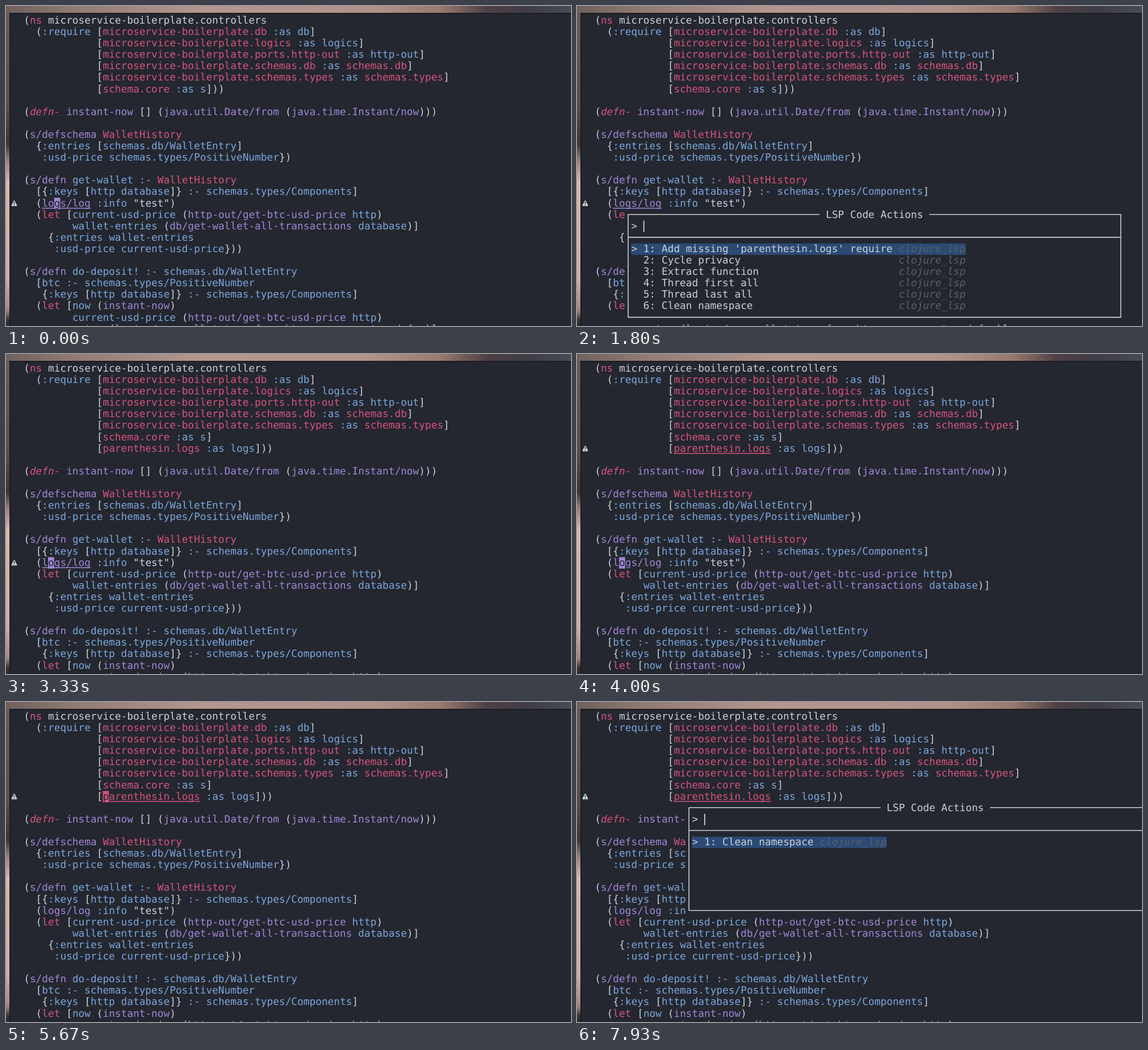
These frames come from a looping animation (995 px wide and 563 px high, 8 s). An HTML page:

```html
<!DOCTYPE html>
<html lang="en">
<head>
<meta charset="utf-8">
<title>Editor code actions</title>
<style>
  html, body { margin: 0; width: 100%; height: 100%; overflow: hidden; background: #24272f; }
  svg { display: block; width: 995px; height: 563px; }
  text {
    font: 17.79px "DejaVu Sans Mono", "Noto Sans Mono", monospace;
    white-space: pre;
    text-rendering: geometricPrecision;
  }
</style>
</head>
<body>
<svg id="stage" viewBox="0 0 995 563">
  <defs>
    <linearGradient id="top">
      <stop offset="0" stop-color="#6f605e"/>
      <stop offset=".12" stop-color="#917b75"/>
      <stop offset=".35" stop-color="#b4988f"/>
      <stop offset=".65" stop-color="#b0938a"/>
      <stop offset=".77" stop-color="#98796f"/>
      <stop offset=".85" stop-color="#4d4045"/>
      <stop offset=".92" stop-color="#3f3d45"/>
      <stop offset="1" stop-color="#484a52"/>
    </linearGradient>
    <linearGradient id="side" x2="0" y2="1">
      <stop offset="0" stop-color="#6a5a57"/>
      <stop offset=".3" stop-color="#5c4d4b"/>
      <stop offset=".42" stop-color="#3c3433"/>
      <stop offset=".47" stop-color="#9a7f76"/>
      <stop offset=".54" stop-color="#d6b9ad"/>
      <stop offset=".85" stop-color="#cdb0a4"/>
      <stop offset=".95" stop-color="#a3867b"/>
      <stop offset=".98" stop-color="#3a3232"/>
      <stop offset="1" stop-color="#2c2a2c"/>
    </linearGradient>
  </defs>
  <rect width="995" height="13" fill="url(#top)"/>
  <rect y="12" width="7" height="551" fill="url(#side)"/>
  <rect x="6" y="12" width="995" height="560" fill="#1b1d22"/>
  <rect x="8" y="14" width="995" height="560" fill="#24272f"/>
</svg>
<script>
const LOOP = 8000, CW = 10.71, RH = 20.1, X0 = 31.2, Y0 = 25;
const C = {
  bg: '#24272f', fg: '#cbd0d8', pink: '#d6537d', blue: '#7ba6dc', violet: '#a087d6',
  str: '#c6d4e2', yellow: '#a6a614', dim: '#5a5f69', sel: '#2b4a74', float: '#212429'
};

const before = `(ns microservice-boilerplate.controllers
  (:require [microservice-boilerplate.db :as db]
            [microservice-boilerplate.logics :as logics]
            [microservice-boilerplate.ports.http-out :as http-out]
            [microservice-boilerplate.schemas.db :as schemas.db]
            [microservice-boilerplate.schemas.types :as schemas.types]
            [schema.core :as s]))

(defn- instant-now [] (java.util.Date/from (java.time.Instant/now)))

(s/defschema WalletHistory
  {:entries [schemas.db/WalletEntry]
   :usd-price schemas.types/PositiveNumber})

(s/defn get-wallet :- WalletHistory
  [{:keys [http database]} :- schemas.types/Components]
  (logs/log :info "test")
  (let [current-usd-price (http-out/get-btc-usd-price http)
        wallet-entries (db/get-wallet-all-transactions database)]
    {:entries wallet-entries
     :usd-price current-usd-price}))

(s/defn do-deposit! :- schemas.db/WalletEntry
  [btc :- schemas.types/PositiveNumber
   {:keys [http database]} :- schemas.types/Components]
  (let [now (instant-now)
        current-usd-price (http-out/get-btc-usd-price http)
        entry (logics/new-wallet-transfers btc now current-usd-fee)]`.split('\n');

const after = [...before];
after.splice(6, 1, '            [schema.core :as s]', '            [parenthesin.logs :as logs]))');

const stage = document.getElementById('stage');
const colX = c => X0 + c * CW;
const rowY = r => Y0 + r * RH;
const cellTop = r => rowY(r) - RH / 2 + .8;

function el(parent, name, attrs = {}) {
  const node = document.createElementNS('http://www.w3.org/2000/svg', name);
  for (const k in attrs) node.setAttribute(k, attrs[k]);
  return parent.appendChild(node);
}
const group = () => el(stage, 'g');

function put(g, row, col, str, fill = C.fg, style = '') {
  const t = el(g, 'text', { x: colX(col), y: rowY(row) + 5.9, fill, style });
  t.textContent = str;
  return t;
}
// Filled block of cells, from column a up to b
const cells = (g, row, a, b, rows, fill) =>
  el(g, 'rect', { x: colX(a), y: cellTop(row), width: (b - a) * CW, height: rows * RH, fill });

function tint(word, prev, row) {
  if (/^[\s()[\]{}]/.test(word)) return C.fg;
  if (word[0] === '"') return C.str;
  if (word[0] === ':') return C.blue;
  if (/^(ns|let|defn-)$/.test(word)) return C.pink;
  if (prev === '(' || word === 'instant-now') return C.violet;
  if (row === 0) return C.fg;
  if (/^(microservice|schema\.core|parenthesin|schemas\.(db|types)$|WalletHistory)/.test(word)) return C.pink;
  return C.blue;
}

const tokens = (line, row) =>
  [...line.matchAll(/\s+|[()[\]{}]+|"[^"]*"|[^\s()[\]{}"]+/g)].map(m =>
    ({ col: m.index, str: m[0], fill: tint(m[0], line[m.index - 1], row) }));

function drawCode(lines) {
  const g = group();
  lines.forEach((line, r) => tokens(line, r).forEach(t => {
    if (t.str.trim()) put(g, r, t.col, t.str, t.fill, t.str === 'defn-' ? 'font-style:italic' : '');
  }));
  return g;
}

// Gutter sign and underline for a flagged word
function drawWarning(row, a, b, fill) {
  const g = group(), y = rowY(row);
  el(g, 'path', { d: `M14.5 ${y - 3.5}L18.5 ${y + 4.5}H10.5Z`, fill: C.fg, stroke: C.fg, 'stroke-width': 2, 'stroke-linejoin': 'round' });
  el(g, 'path', { d: `M14.5 ${y - 2}v3.4m0 1.3v1.5`, stroke: C.bg, 'stroke-width': 1.5 });
  el(g, 'rect', { x: colX(a), y: y + 8.4, width: (b - a) * CW, height: 1.5, fill });
  return g;
}

function drawDiagnostics(row, col, msg) {
  const g = group();
  cells(g, row, col, col + msg.length + 5, 2, C.float);
  put(g, row, col + 1, 'Diagnostics:', C.fg, 'font-weight:bold');
  put(g, row + 1, col + 1, '1.');
  put(g, row + 1, col + 4, msg, C.yellow);
  return g;
}

function drawActions(row, col, rows, titleCol, items) {
  const g = group(), width = 82;
  const l = colX(col + .5), r = colX(col + .5 + width - 1), t = rowY(row), b = rowY(row + rows);
  const title = 'LSP Code Actions', tagCol = col + 7 + Math.max(...items.map(s => s.length));
  cells(g, row, col, col + width, rows + 1, C.bg);
  el(g, 'path', {
    d: `M${colX(titleCol - 1)} ${t}H${l}V${b}H${r}V${t}H${colX(titleCol + title.length + 1)}M${l} ${rowY(row + 2)}H${r}`,
    fill: 'none', stroke: C.fg, 'stroke-width': 1.6, 'stroke-linejoin': 'round'
  });
  put(g, row, titleCol, title);
  put(g, row + 1, col + 1, '>');
  el(g, 'rect', { x: colX(col + 3), y: cellTop(row + 1), width: 1.8, height: RH, fill: C.fg });
  cells(g, row + 3, col + 1, tagCol + 11, 1, C.sel);
  items.forEach((item, i) => {
    put(g, row + 3 + i, col + 1, `${i ? ' ' : '>'} ${i + 1}: ${item}`);
    put(g, row + 3 + i, tagCol, 'clojure_lsp', C.dim, 'font-style:italic');
  });
  return g;
}

// Each layer is visible from one time up to another
const APPLY = 2870, RELINT = 3730, OPEN1 = 1470, OPEN2 = 7000;
const layers = [
  [drawCode(before), 0, APPLY],
  [drawCode(after), APPLY, LOOP],
  [drawWarning(16, 3, 11, C.violet), 0, APPLY],
  [drawWarning(17, 3, 11, C.violet), APPLY, RELINT],
  [drawWarning(7, 13, 29, C.pink), RELINT, LOOP]
];
const cursor = group();
const block = cells(cursor, 0, 0, 1, 1, C.fg);
const letter = put(cursor, 0, 0, '', C.bg);
layers.push(
  [cursor, 0, OPEN1], [cursor, APPLY, OPEN2],
  [drawDiagnostics(17, 5, 'Unresolved namespace logs. Are you missing a require?'), 130, OPEN1],
  [drawActions(17, 5, 9, 38, ["Add missing 'parenthesin.logs' require", 'Cycle privacy', 'Extract function',
    'Thread first all', 'Thread last all', 'Clean namespace']), OPEN1, APPLY],
  [drawDiagnostics(8, 15, 'Unsorted namespace: parenthesin.logs'), 6000, OPEN2],
  [drawActions(8, 15, 9, 48, ['Clean namespace']), OPEN2, LOOP]
);

// Cursor stops: time, row, column
const stops = [[0, 16, 5], [APPLY, 17, 4], [4870, 16, 4]];
for (let r = 15; r >= 7; r--) stops.push([5070 + (15 - r) * 45, r, after[r] ? 4 : 0]);
stops.push([5540, 7, 12], [5640, 7, 13], [5730, 7, 14], [5800, 7, 15]);

function placeCursor(time) {
  const [, row, col] = stops.findLast(s => s[0] <= time);
  const line = (time < APPLY ? before : after)[row];
  const tok = tokens(line, row).findLast(t => t.col <= col);
  block.setAttribute('x', colX(col));
  block.setAttribute('y', cellTop(row));
  block.setAttribute('fill', tok ? tok.fill : C.fg);
  letter.setAttribute('x', colX(col));
  letter.setAttribute('y', rowY(row) + 5.9);
  letter.textContent = line[col] || '';
}

function render(time) {
  const shown = new Set(layers.filter(([, a, b]) => time >= a && time < b).map(l => l[0]));
  for (const [g] of layers) g.style.display = shown.has(g) ? '' : 'none';
  placeCursor(time);
}

const start = performance.now();
function tick() {
  render((performance.now() - start) % LOOP);
  requestAnimationFrame(tick);
}
tick();
</script>
</body>
</html>
```
